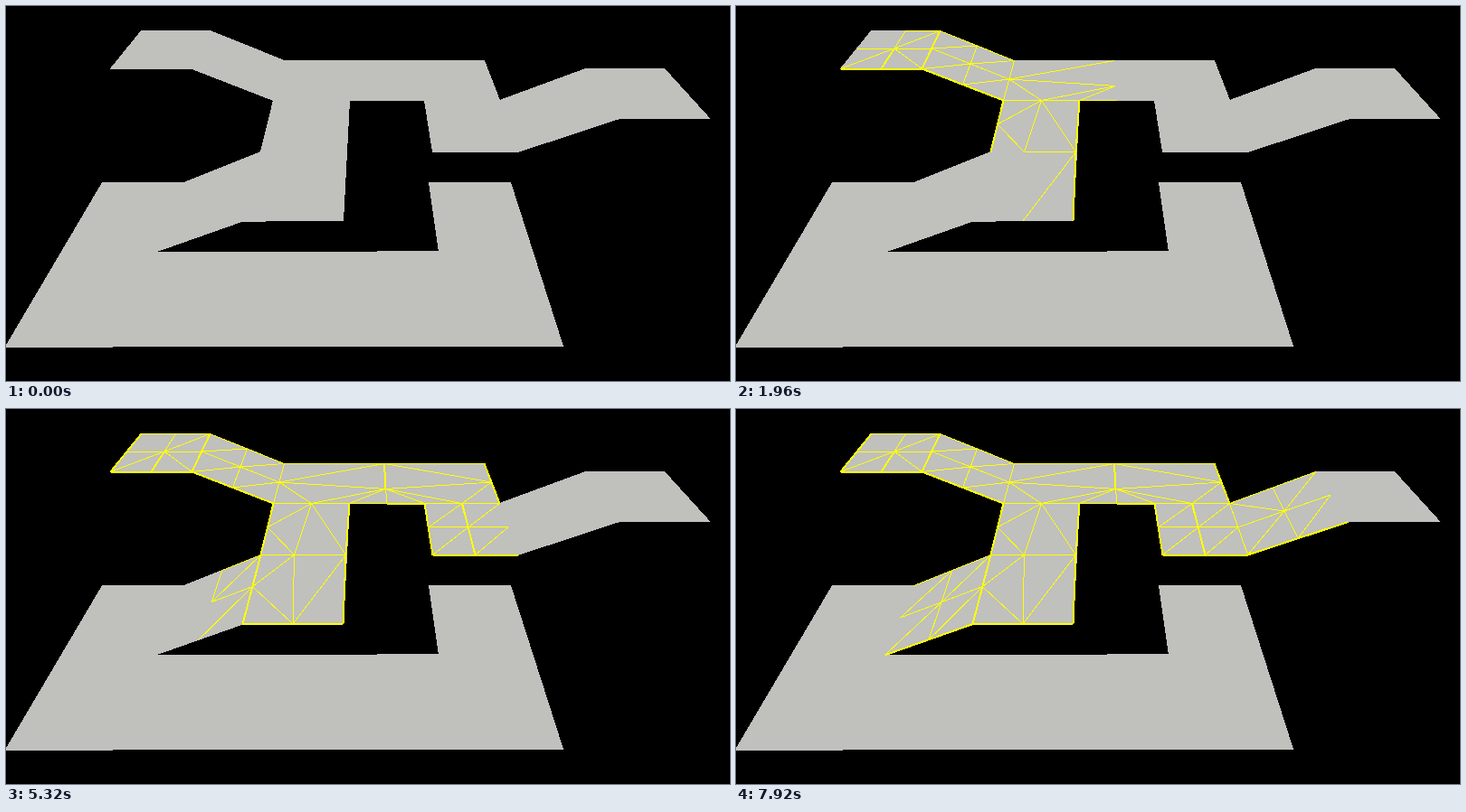
Write an HTML page that moves like this. It is 800 px wide and 415 px high and loops after 8000 ms.

```html
<!DOCTYPE html>
<html>
<head>
<meta charset="utf-8">
<title>Mesh search</title>
<style>
html, body { margin: 0; width: 100%; height: 100%; overflow: hidden; background: #000; }
svg { display: block; shape-rendering: crispEdges; }
polygon { fill: #c0c0bd; stroke: #c0c0bd; }
line { stroke: #ff0; }
</style>
</head>
<body>
<svg width="800" height="415"><g id="scene" transform="translate(0.5 0.5)"></g></svg>
<script>
const scene = document.getElementById('scene');
const LOOP = 8000;
const HORIZON = -250;

// Floor outline; corners used by the mesh carry a one-letter name.
const outline = [
  [149, 27, 'c'], [225, 27, 'g'], [307, 60, 'm'], [528, 60, 'O'], [545, 104, 'P'],
  [640, 69, 'U'], [727, 69], [777, 124], [676, 124.5, 'W'], [565, 161, 'R'],
  [471, 161, 'L'], [462, 104, 'H'], [379, 104, 'w'], [372, 237.2, 'y'], [261, 237.6, 'A'],
  [164, 271.9, 'G'], [478, 271.4], [467, 195], [557, 195], [615, 376.1], [-1, 376.6],
  [106, 195], [196, 195, 'E'], [281, 161, 'v'], [295, 104, 'o'], [205, 69, 'i'], [115, 69, 'b']
];
const points = { r: [419, 88], u: [318, 161], t: [375, 161], Z: [529, 81] };
for (const [x, y, name] of outline) if (name) points[name] = [x, y];

// Ramp edges are halved on screen, all others on the floor plane in perspective.
const ramps = 'jgm lio CEv DGA SPU XRW'.split(' ');
const floors = 'acb dcg fbi hgi edf kjl nmo pow qov smO YwH xAy zvA ' +
  'BCD FEG JHL IHP MLR KIM NOP QPR TSX VUW';

function midpoint([x1, y1], [x2, y2], depth) {
  const z1 = depth(y1), z2 = depth(y2);
  return [(x1 * z1 + x2 * z2) / (z1 + z2), (y1 * z1 + y2 * z2) / (z1 + z2)];
}
for (const [name, a, b] of ramps)
  points[name] = midpoint(points[a], points[b], () => 1);
for (const [name, a, b] of floors.split(' '))
  points[name] = midpoint(points[a], points[b], y => 1 / (y - HORIZON));

// Each group spreads its edges evenly over a time span; * marks a heavy edge.
const groups = [
  [80, 1060, 'fb* fi* be ef* ei ae ed eg eh hi* hg* hj hk gj ik jk kl il* km kn ln lo* no np op oq* pq pw pr pu pt'],
  [1120, 1940, 'jm dg mn ns nr wr wY wt* ty* tx tu qu qv*'],
  [2000, 2520, 'cd ac* ms sr* Yr YH* rH'],
  [2560, 3340, 'HJ* rI rZ ux uv vB JI JK JL* KL HI'],
  [3400, 3980, 'ab* vz* zu vC LM*'],
  [4040, 5040, 'ZN sN sO ON* NP* NI IP IK* KM* KP KQ MQ MR* zB zx zA* Ax* xy* zD'],
  [5120, 5280, 'tv BC'],
  [5360, 6340, 'PQ QR PT AD* QT PS'],
  [6400, 6760, 'ST RT RX*'],
  [6840, 7600, 'TX TU SU BD TV XV BF CE CF'],
  [7640, 7900, 'XW* BG DG*']
];

function add(tag, attributes) {
  const node = document.createElementNS('http://www.w3.org/2000/svg', tag);
  for (const key in attributes) node.setAttribute(key, attributes[key]);
  return scene.appendChild(node);
}

add('polygon', { points: outline.map(([x, y]) => x + ',' + y).join(' ') });

const edges = groups.flatMap(([start, end, list]) => {
  const names = list.split(' ');
  return names.map(([a, b, heavy], i) => {
    const [x1, y1] = points[a], [x2, y2] = points[b];
    return {
      node: add('line', { x1, y1, x2, y2, 'stroke-width': heavy ? 2 : 1 }),
      time: Math.round((start + (end - start) * i / (names.length - 1)) / 40) * 40
    };
  });
});

const origin = performance.now();
function frame() {
  const now = (performance.now() - origin) % LOOP;
  for (const { node, time } of edges)
    node.style.visibility = now >= time ? 'visible' : 'hidden';
  requestAnimationFrame(frame);
}
frame();
</script>
</body>
</html>
```
